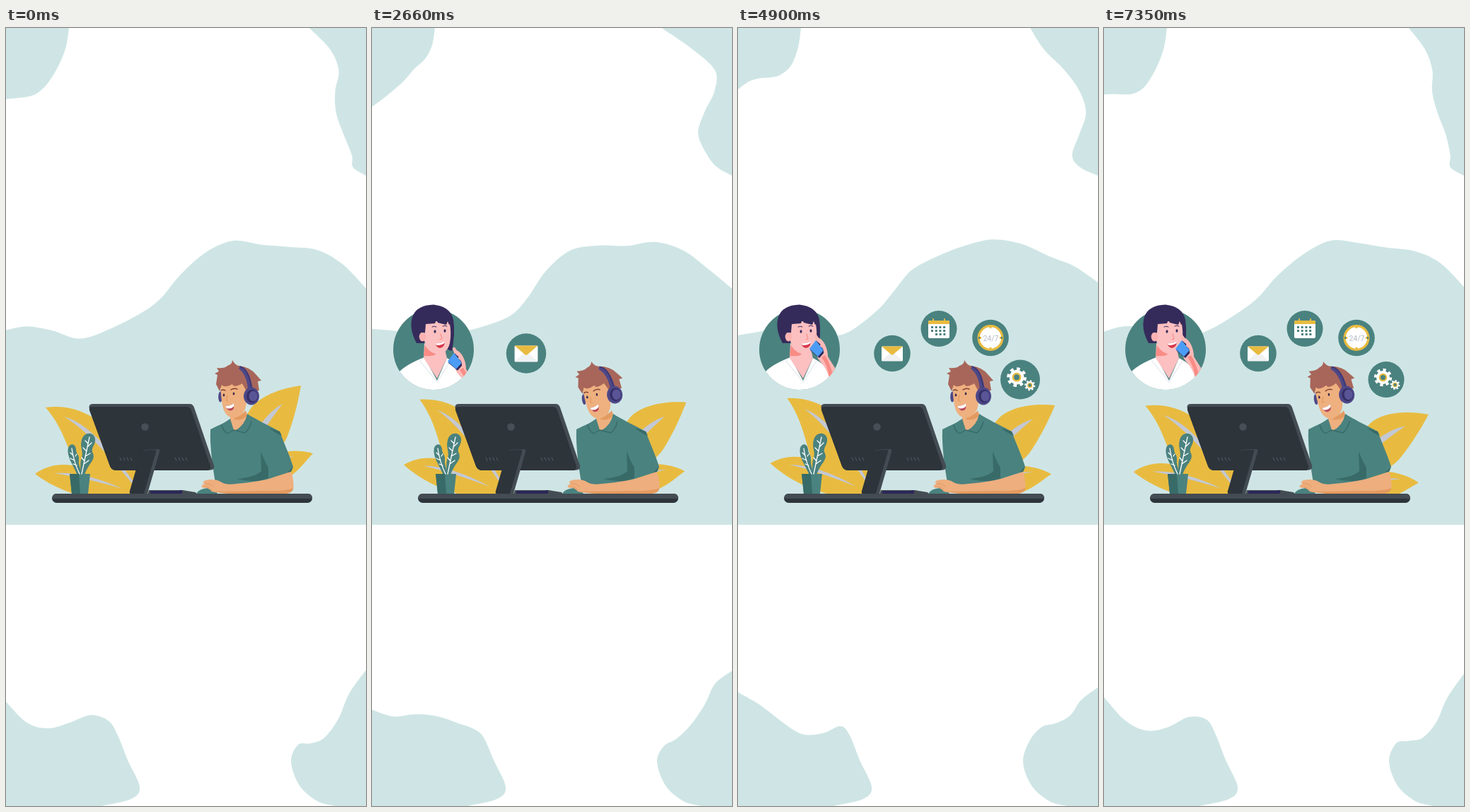
An HTML page for the animation above (7.42 s loop, 509 by 1101 pixels).

```html
<!DOCTYPE html>
<html lang="en">
<head>
<meta charset="utf-8">
<title>Support desk</title>
<style>
html, body { margin: 0; width: 100%; height: 100%; overflow: hidden; background: #fff; }
svg { display: block; width: 100vw; height: 100vh; }
.line { fill: none; stroke-linecap: round; stroke-linejoin: round; }
</style>
</head>
<body>
<svg viewBox="0 0 509 1101" preserveAspectRatio="none">
  <defs>
    <clipPath id="round"><circle cx="87" cy="455" r="57"/></clipPath>
  </defs>

  <g id="blobs" fill="#cfe5e5"></g>

  <g id="leavesL" fill="#e8bb40">
    <path d="M56 537C90 532 120 545 140 565C170 595 195 630 200 672C150 668 115 650 100 622C85 590 80 565 56 537Z"/>
    <path d="M82 550Q130 562 200 672Q125 575 82 550Z" fill="#c3c8d5"/>
    <path d="M41 631C65 614 95 614 125 630C155 642 180 655 200 672C150 672 90 668 41 631Z"/>
    <path d="M68 630Q110 627 165 652Q110 636 68 630Z" fill="#c3c8d5"/>
  </g>
  <g id="leavesR" fill="#e8bb40">
    <path d="M434 602C415 596 385 597 365 610C340 625 325 640 310 657C345 660 385 650 405 632C420 620 424 612 434 602Z"/>
    <path d="M408 605Q370 612 310 657Q375 618 408 605Z" fill="#c3c8d5"/>
    <path d="M417 506C385 510 352 524 342 545C325 580 312 620 310 657C345 640 385 605 397 580C405 560 412 535 417 506Z"/>
    <path d="M391 532Q352 552 310 657Q364 566 391 532Z" fill="#c3c8d5"/>
  </g>

  <!-- agent -->
  <path d="M341 546C352 553 368 561 387 571C393 588 401 604 406 621L403 628L375 637L372 655H298C292 622 288 592 289 568C300 562 310 559 318 553Z" fill="#4a827f"/>
  <path d="M372 566L387 571L390 577Q380 573 372 566ZM360 599Q366 614 371 622V637L358 641Q345 642 326 638Q352 636 361 627ZM406 621L403 628L398 629Z" fill="#386b68"/>
  <path d="M317 551L340 543L342 549Q338 563 323 570L316 562Z" fill="#eeb07f"/>
  <path d="M322 551Q334 549 339 541L340 549Q334 556 323 554Z" fill="#e39a5f"/>
  <path d="M317 553L322 569L313 575Q305 569 305 561ZM341 546Q349 555 349 561L338 574L324 570Q338 562 341 546Z" fill="#4a827f"/>
  <path class="line" d="M305 562Q307 570 313 574L322 569L338 573Q345 566 347 557" stroke="#386b68" stroke-width="1.4"/>

  <g id="head">
    <ellipse cx="303" cy="522" rx="2.8" ry="7.5" fill="#4d4888"/>
    <path d="M303 502H338Q342 520 339 536Q336 549 322 552Q312 551 308 541Q304 530 303 502Z" fill="#eeb07f"/>
    <path d="M297 504L299 491L295 489L301 486L298 481Q309 482 313 478Q320 476 320 470Q324 477 329 478Q346 480 354 491L361 499L356 500L358 513L340 514L334 503Q322 510 320 504Q309 510 305 505L302 514Z" fill="#a8665a"/>
    <path d="M331 479Q344 481 349 511L342 513Q341 491 329 482Z" fill="#4d4888"/>
    <path d="M331 479Q344 483 347 511" class="line" stroke="#3a3570" stroke-width="1.6"/>
    <ellipse cx="347" cy="521" rx="11" ry="12.5" fill="#4d4888"/>
    <ellipse cx="348" cy="521" rx="8" ry="9.2" fill="#352f66"/>
    <ellipse cx="349.5" cy="521" rx="6" ry="7.3" fill="#5a5596"/>
    <path class="line" d="M304 513Q307 511 310 513M318 512Q322 509 327 511" stroke="#7d4438" stroke-width="1.5"/>
    <path class="line" d="M313 520L311.5 527L314 528" stroke="#e39a5f" stroke-width="1.3"/>
    <g id="agentEyes" fill="#3b2b4b"><ellipse cx="308" cy="519.5" rx="1.3" ry="2"/><ellipse cx="322" cy="517.5" rx="1.3" ry="2"/></g>
    <path id="agentLids" class="line" d="M306 520H310M320 518H324" stroke="#a8665a" stroke-width="1"/>
    <path d="M310 535Q318 535 322 531Q324 541 317 541.500Q313 541 310 535Z" fill="#b8485a"/>
    <path d="M310 535Q318 535 322 531L322.500 535Q318 540 312 538Z" fill="#fff"/>
  </g>

  <!-- monitor -->
  <path d="M123 532H260Q264 532 266 537L294 619Q295 625 290 625.500H154Q149 625 147 620L118 539Q116 532 123 532Z" fill="#444c53"/>
  <path d="M122 536H256Q260 536 262 541L289 620Q290 626 285 626H154Q149 625 147 620L118 541Q117 536 122 536Z" fill="#2d343a"/>
  <circle cx="196.500" cy="564.500" r="5.300" fill="#474f56"/>
  <path id="vents" class="line" stroke="#505860" stroke-width="1.100"/>
  <path d="M196 596H216Q218 597 217 600L200 659H180Z" fill="#444c53"/>
  <path d="M195 596H210Q213 596 212 600L195 659H176Q174 658 175 655L191 600Q192 597 195 596Z" fill="#2d343a"/>
  <path class="line" d="M194 598Q200 596 214 597" stroke="#444c53" stroke-width=".8"/>
  <path d="M202 654H250L268 657L270 660H200Z" fill="#444c53"/>
  <path d="M204 655H246V659H204ZM245 654H249V660H245Z" fill="#2c2858"/>

  <!-- desk -->
  <rect x="65" y="659" width="368" height="13" rx="6.500" fill="#2d343a"/>
  <path d="M65.500 666Q65 659 72 659H427Q433 659 433 666Z" fill="#444c53"/>

  <!-- arm and mouse -->
  <path d="M269 659Q273 652 285 651Q296 652 299 659Z" fill="#4a827f"/>
  <path d="M375 637L403 628Q407 639 406.500 650Q405 658 394 659H318Q300 658 291 656Q287 650 277 650Q275 647 281 645Q276 643 282 640Q296 637 305 643Q312 647 325 645Q358 642 375 637Z" fill="#eeae7e"/>
  <path d="M406.500 651Q405 659 394 659H318Q304 658 294 656Q330 656 365 655Q395 656 406.500 651Z" fill="#e39a5f"/>
  <path class="line" d="M281 645Q289 644 293 649M279 650Q287 648 291 654" stroke="#e39a5f" stroke-width="1"/>

  <!-- plant -->
  <g fill="#4a827f">
    <path d="M101 633C96 620 85 606 88 594C91 587 98 588 99 596C99 603 104 604 103 611C102 620 107 625 107 633Z"/>
    <path d="M105 633C106 621 104 616 107 608C110 600 104 594 107 583C110 571 124 571 126 581C127 591 119 594 123 602C127 612 116 616 111 633Z"/>
    <path d="M90 631H119L116 659H93Z"/>
    <path d="M90 631H103L105 659H93Z" fill="#386b68"/>
  </g>
  <path class="line" d="M93 595Q96 615 104 631M95 605L91 601M97 612L91 609M98 606L100 603M100 619L95 617M118 579Q113 603 107 631M116 588L112 584M116 592L121 587M114 599L109 594M112 606L119 602M111 613L107 608M110 617L117 612" stroke="#fff" stroke-width="1.300"/>

  <!-- caller -->
  <g id="caller">
    <circle cx="87" cy="455" r="57" fill="#4a827f"/>
    <g clip-path="url(#round)">
      <path d="M25 515L37 488Q48 476 74 466L92 499L106 467Q124 476 140 496V515Z" fill="#fff"/>
      <path d="M74 446L103 455L106 467L92 496L73 467Z" fill="#fcc0c1"/>
      <path d="M75 449Q81 459 90 461Q89 465 73 464Z" fill="#f98c85"/>
      <path class="line" d="M67 470L92 501L111 471" stroke="#e9edf1" stroke-width="1.500"/>
    </g>
    <path d="M63 446Q52 426 57 409Q63 392 87 391.500Q111 394 115 413Q118 432 113 457L104 454L107 418H75L74 446Z" fill="#352b5b"/>
    <path d="M75 415H109Q113 430 110 446Q106 461 95 461Q78 459 74 442Z" fill="#fcc0c1"/>
    <ellipse cx="71.500" cy="437" rx="4.800" ry="6.500" fill="#fcb3b2"/>
    <path d="M70 422Q78 405 92 400Q108 404 113 416L109 420L107 415L105 420L93 417L91 413L89 418L76 419L75 431H70Z" fill="#352b5b"/>
    <path class="line" d="M85 423Q88 421 91 423M100 422Q103 420 106 422" stroke="#352b5b" stroke-width="1"/>
    <g id="callerEyes" fill="#352b5b"><ellipse cx="89" cy="429.500" rx="1.500" ry="2.300"/><ellipse cx="103" cy="428.500" rx="1.500" ry="2.300"/></g>
    <path id="callerLids" class="line" d="M87 430H91M101 429H105" stroke="#b5707a" stroke-width="1"/>
    <path class="line" d="M97 433L99 440L96 441" stroke="#f98c85" stroke-width="1.100"/>
    <path d="M89 446Q97 447 103 443Q103 452 96 453Q91 452 89 446Z" fill="#d63a4b"/>
    <path d="M89 446Q97 447 103 443L102.500 446Q97 450 90.500 448.500Z" fill="#fff"/>
    <g clip-path="url(#round)"><g id="hand">
      <path d="M109 434Q113 435 115 441Q120 442 123 448Q127 456 127 465L139 484L129 495Q125 481 116 472Q109 464 112 453Z" fill="#fcb9b6"/>
      <path d="M118 466Q126 475 129 495L134 490Q130 474 123 463Z" fill="#f98c85"/>
      <path d="M102 456L112 442L124 457L115 467Z" fill="#2c2a5c"/>
      <path d="M101 454L110 442L121 456L113 465Z" fill="#4c9cf5"/>
      <path class="line" d="M110 436Q112 442 117 445M113 440Q118 442 121 449M118 449Q124 453 123 459" stroke="#fcb9b6" stroke-width="4"/>
    </g></g>
  </g>

  <!-- service icons -->
  <g id="mail">
    <circle cx="218" cy="460.500" r="25.800" fill="#4a827f"/>
    <rect x="203" y="450.500" width="30" height="21" rx="1.500" fill="#fff"/>
    <path d="M203 471L215 460H221L233 471Z" fill="#f0f1f3"/>
    <path d="M203 450.500H233L219.500 462Q218 463 216.500 462Z" fill="#e8bb40"/>
  </g>
  <g id="calendar">
    <circle cx="284" cy="425.500" r="25.500" fill="#4a827f"/>
    <rect x="269" y="414" width="30" height="25" rx="2" fill="#fff"/>
    <path d="M269 419V416Q269 414 271 414H297Q299 414 299 416V419Z" fill="#e8bb40"/>
    <path class="line" d="M276 412V416M292 412V416" stroke="#e8bb40" stroke-width="2"/>
    <path d="M273 423.500H295M273 428.500H295M279 433.500H295" stroke="#4a827f" stroke-width="3" stroke-dasharray="3 2.700" fill="none"/>
  </g>
  <g id="clock">
    <circle cx="357" cy="438.500" r="25.800" fill="#4a827f"/>
    <circle cx="357" cy="438.500" r="16.800" fill="#fff" stroke="#e8bb40" stroke-width="3.300"/>
    <path d="M357 421V425M357 452V456M340 438.500H344M370 438.500H374" stroke="#e8bb40" stroke-width="3"/>
    <path d="M340 438.500H342M372 438.500H374" stroke="#4a827f" stroke-width="3"/>
    <text x="357.500" y="442.500" text-anchor="middle" font-family="Roboto, Arial, sans-serif" font-size="10.500" fill="#b4b8c7">24/7</text>
  </g>
  <g id="gears">
    <circle cx="399" cy="497.500" r="25.500" fill="#4a827f"/>
  </g>
</svg>
<script>
const LOOP = 7420, STEP = 70, WAVE = 3545, RIPPLE = 2.07;
const $ = id => document.getElementById(id);
const clamp = v => Math.max(0, Math.min(1, v));
const ease = v => { v = clamp(v); return v * v * (3 - 2 * v); };
const glide = (t, start, span) => ease((t - start) / span);
const set = (id, transform) => $(id).setAttribute('transform', transform);
const show = (id, on) => { $(id).style.display = on ? '' : 'none'; };
const points = s => s ? s.split(' ').map(p => p.split(',').map(Number)) : [];

function add(parent, tag, attrs) {
  const el = document.createElementNS('http://www.w3.org/2000/svg', tag);
  for (const name in attrs) el.setAttribute(name, attrs[name]);
  return $(parent).appendChild(el);
}

// smooth path through a list of points
function spline(p) {
  const at = i => p[Math.max(0, Math.min(p.length - 1, i))];
  let d = 'M' + p[0];
  for (let i = 0; i < p.length - 1; i++) {
    const [a, b, c, e] = [at(i - 1), at(i), at(i + 1), at(i + 2)];
    const h1 = b.map((v, j) => v + (c[j] - a[j]) / 6);
    const h2 = c.map((v, j) => v - (e[j] - b[j]) / 6);
    d += `C${h1} ${h2} ${c}`;
  }
  return d;
}

// Each edge carries a wave that runs along it and fades out at its pin.
function blob(edge, { tail = '', close, axis = 1, amp = 14, lag, ripple = RIPPLE, pin = Infinity }) {
  const base = points(edge), end = points(tail), path = add('blobs', 'path', {});
  return t => {
    const moved = base.map(p => {
      const along = p[1 - axis], q = [...p];
      const angle = 2 * Math.PI * t / WAVE - (lag + ripple * along) * Math.PI / 180;
      q[axis] += amp * clamp(Math.abs(along - pin) / 30) * Math.cos(angle);
      return q;
    });
    path.setAttribute('d', spline([...moved, ...end]) + close);
  };
}

const blobs = [
  blob('0,98 15,90 30,84 45,78 60,67 75,50 85,26 89,0',
    { close: 'H0Z', lag: -80, pin: 89 }),
  blob('417,0 446,30 471,60 478,90 478,120 475,150 478,180 487,197',
    { tail: '509,209', close: 'V0Z', axis: 0, lag: 32, ripple: -RIPPLE, pin: 205 }),
  blob('0,951 30,970 60,981 90,987 120,986 145,987 158,1002',
    { tail: '172,1036 189,1074 177,1091 135,1101', close: 'H0Z', lag: -80, pin: 163 }),
  blob('509,919 485,942 470,970 450,991 430,1001 413,1012',
    { tail: '403,1038 415,1072 440,1094 465,1101', close: 'H509Z', lag: 165, pin: 403 }),
  blob('0,430 30,427 65,427 105,435 150,428 195,403 220,378 245,346 280,320 320,306 360,304 400,306 440,318 475,337 509,365',
    { close: 'V703H0Z', amp: 5, lag: 120, ripple: 2.5 })
];

function gear(cx, cy, r) {
  const ring = (radius, width, stroke, extra) => add('gears', 'circle',
    { cx, cy, r: radius * r, 'stroke-width': width * r, stroke, fill: 'none', ...extra });
  ring(0.86, 0.34, '#fff', { pathLength: 16, 'stroke-dasharray': 1 });
  ring(0.6, 0.34, '#fff');
  ring(0.38, 0.18, '#e8bb40');
}
gear(394.5, 494.5, 12.3);
gear(411.5, 505, 6.7);

$('vents').setAttribute('d', [161, 239].map(x =>
  [0, 1, 2, 3].map(i => `M${x + 5 * i} 608l2 4`).join('')).join(''));

// id, centre and start of each bubble
const pops = [
  ['caller', 87, 455, 1010], ['mail', 218, 460.5, 1945], ['calendar', 284, 425.5, 2790],
  ['clock', 357, 438.5, 3400], ['gears', 399, 497.5, 4220]
];
const pop = age => 1.1 * glide(age, 0, 600) - 0.1 * glide(age, 600, 800);

function blink(name, closed) {
  show(name + 'Eyes', !closed);
  show(name + 'Lids', closed);
}
const near = (t, mid) => Math.abs(t - mid) <= 100;

function draw(t) {
  blobs.forEach(move => move(t));

  const leanL = 7.6 * clamp(t / 4340) - 4.7 * glide(t, 4340, 1190) - 1.9 * glide(t, 5530, 1820);
  const leanR = 11.2 * glide(t, 0, 2200) + 7 * glide(t, 4340, 1700);
  const nod = glide(t, 300, 1000) - glide(t, 3700, 900) + glide(t, 5900, 1000);
  set('leavesL', `rotate(${leanL} 200 672)`);
  set('leavesR', `rotate(${leanR} 310 657)`);
  set('head', `rotate(${-7.3 * nod} 330 550)`);

  for (const [id, x, y, start] of pops) {
    show(id, t > start);
    set(id, `translate(${x} ${y}) scale(${pop(t - start)}) translate(${-x} ${-y})`);
  }
  const away = 1 - glide(t, 2250, 600);
  show('hand', away < 1);
  set('hand', `translate(${25 * away} ${75 * away})`);

  blink('agent', near(t, 3220));
  blink('caller', near(t, 3220) || near(t, 4340));
}

const begin = performance.now();
function tick() {
  const t = (performance.now() - begin) % LOOP;
  draw(Math.floor(t / STEP) * STEP);
  requestAnimationFrame(tick);
}
tick();
</script>
</body>
</html>
```
